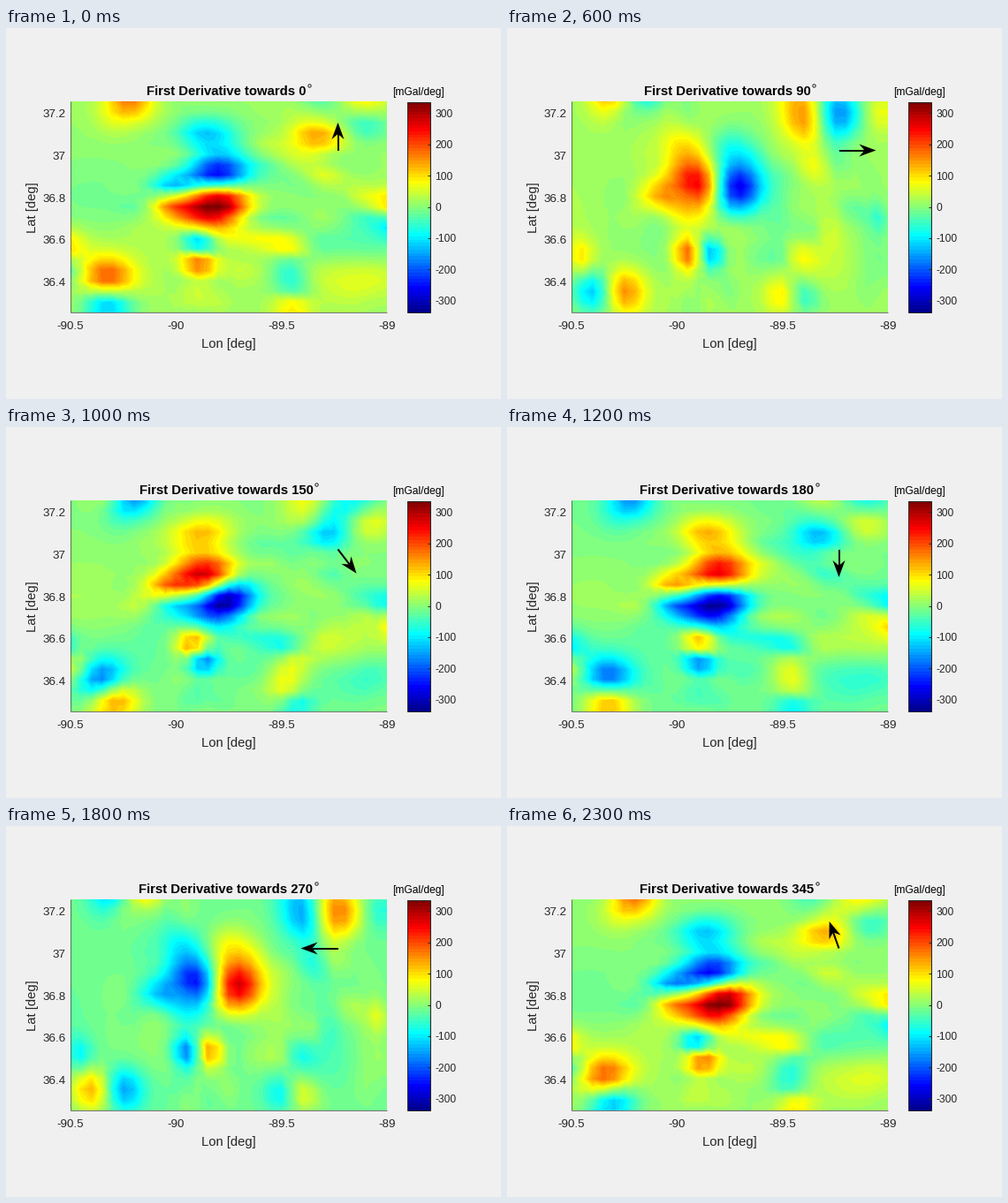
These frames come from a looping animation (560x420 px, 2.4 s). A matplotlib script:

```python
import numpy as np
import matplotlib.pyplot as plt
from matplotlib.animation import FuncAnimation
from matplotlib.colors import ListedColormap
from matplotlib.patches import Polygon, Rectangle
from matplotlib.tri import Triangulation

W, H, DPI = 560, 420, 100
PX = 72 / DPI
STEPS, LOOP_MS = 24, 2400
LEFT, RIGHT, TOP, BOTTOM = 73, 431, 83, 322
PX_PER_DEG = 239
VMAX = 336
NX, NY = 31, 21
INK = "#262626"

# Main gravity highs and lows: x, y, width, height (px), strength (mGal)
ANOMALIES = [
    (237, 182, 26, 22, 54), (225, 133, 26, 17, 14), (188, 190, 17, 12, 11),
    (218, 255, 14, 13, 17), (354, 105, 20, 19, 19), (350, 75, 22, 14, 10),
    (138, 66, 20, 17, 20), (115, 298, 20, 18, -20), (285, 228, 28, 13, 6),
    (405, 96, 20, 16, -8), (325, 300, 16, 14, 7), (395, 262, 40, 25, 8),
    (68, 260, 15, 15, -9), (436, 212, 14, 14, -9), (100, 235, 60, 45, 8),
]

gx, gy = np.meshgrid(np.linspace(LEFT, RIGHT, NX), np.linspace(TOP, BOTTOM, NY))


def gradient(bumps, north=12.0, east=15.0):
    """North and east slope of a sum of Gaussian bumps over a regional trend."""
    for x, y, sx, sy, amp in bumps:
        dx, dy = gx - x, gy - y
        g = amp * PX_PER_DEG * np.exp(-(dx / sx) ** 2 / 2 - (dy / sy) ** 2 / 2)
        north = north + g * dy / sy ** 2
        east = east - g * dx / sx ** 2
    return north.ravel(), east.ravel()


# Small seeded bumps give the rest of the map its texture
rng = np.random.default_rng(4)
texture = [(rng.uniform(LEFT, RIGHT), rng.uniform(TOP, BOTTOM),
            *rng.uniform(10, 17, 2), rng.normal(0, 1.7)) for _ in range(60)]
north, east = gradient(ANOMALIES + texture)

# Every grid cell is split along its falling diagonal
a = (np.arange(NY - 1)[:, None] * NX + np.arange(NX - 1)).ravel()
cells = np.vstack([np.c_[a, a + 1, a + NX + 1], np.c_[a, a + NX + 1, a + NX]])
mesh = Triangulation(gx.ravel(), gy.ravel(), cells)

t = np.arange(1, 65) / 64
jet = np.clip(1.5 - np.abs(4 * t[:, None] - [3, 2, 1]), 0, 1)
levels = np.linspace(-VMAX, VMAX, 65)

fig = plt.figure(figsize=(W / DPI, H / DPI), dpi=DPI, facecolor="#f0f0f0")
ax = fig.add_axes([0, 0, 1, 1])
ax.set_xlim(0, W)
ax.set_ylim(H, 0)
ax.axis("off")


def label(x, y, s, size, ha="center", color=INK, **kw):
    return ax.text(x, y, s, fontsize=size * PX, ha=ha, va="baseline",
                   color=color, family="Liberation Sans", **kw)


def line(xs, ys, alpha=1):
    ax.plot(xs, ys, color=INK, lw=PX, alpha=alpha, zorder=4,
            solid_capstyle="butt")


# Map axes
line([LEFT - 0.5, LEFT - 0.5], [TOP, BOTTOM], 0.6)
line([LEFT, RIGHT], [BOTTOM - 0.5, BOTTOM - 0.5], 0.6)
for i in range(4):
    label(72.5 + i * PX_PER_DEG / 2, 340.7, f"{-90.5 + i / 2:g}", 13.33)
for i in range(5):
    label(67.5, 101.2 + 47.7 * i, f"{37.2 - i / 5:g}", 13.33, ha="right")
label(252, 362, "Lon [deg]", 14.9)
label(34, 203, "Lat [deg]", 14.9, rotation=90, rotation_mode="anchor")

# Colour bar
BAR_L, BAR_R, BAR_T, BAR_B = 453.5, 479.5, 83.5, 321.5
ax.pcolormesh([BAR_L, BAR_R], np.linspace(BAR_B, BAR_T, 65),
              np.arange(64)[:, None], cmap=ListedColormap(jet))
ax.add_patch(Rectangle((BAR_L, BAR_T), BAR_R - BAR_L, BAR_B - BAR_T,
                       fill=False, ec=INK, lw=PX, zorder=4))
for v in range(-300, 301, 100):
    y = (BAR_T + BAR_B) / 2 - v * (BAR_B - BAR_T) / (2 * VMAX)
    line([BAR_R - 3, BAR_R], [y, y])
    label(485, y + 4.5, str(v), 12, ha="left")
label(467, 76, "[mGal/deg]", 12, color="black")

title = label(249, 76, "", 14.9, color="black", weight="bold")
degree, = ax.plot([], [], "o", ms=3.4 * PX, mfc="none", mec="black",
                  mew=0.8 * PX)

# Direction arrow
TAIL = np.array([375.5, 138.5])
shaft, = ax.plot([], [], color="black", lw=2 * PX, zorder=5,
                 solid_capstyle="butt")
head = ax.add_patch(Polygon(np.zeros((4, 2)), fc="black", ec="none", zorder=5))
contours = None


def draw(frame):
    global contours
    deg = frame * 360 // STEPS
    s, c = np.sin(np.radians(deg)), np.cos(np.radians(deg))

    if contours is not None:
        contours.remove()
    z = np.clip(c * north + s * east, -VMAX + 0.1, VMAX - 0.1)
    contours = ax.tricontourf(mesh, z, levels=levels, colors=jet, zorder=1)

    title.set_text(f"First Derivative towards {deg}")
    degree.set_data([343 + 4.15 * (len(str(deg)) - 1)], [64.5])

    reach = np.array([0.075 * W * s, -0.075 * H * c])
    tip = TAIL + reach
    u = reach / np.hypot(*reach)
    side = 7 * np.array([-u[1], u[0]])
    notch = tip - 13 * u
    shaft.set_data(*zip(TAIL, notch))
    head.set_xy([tip, tip - 19 * u + side, notch, tip - 19 * u - side])
    return []


anim = FuncAnimation(fig, draw, frames=STEPS, interval=LOOP_MS / STEPS,
                     init_func=lambda: [], repeat=True, repeat_delay=0)
plt.show()
```
